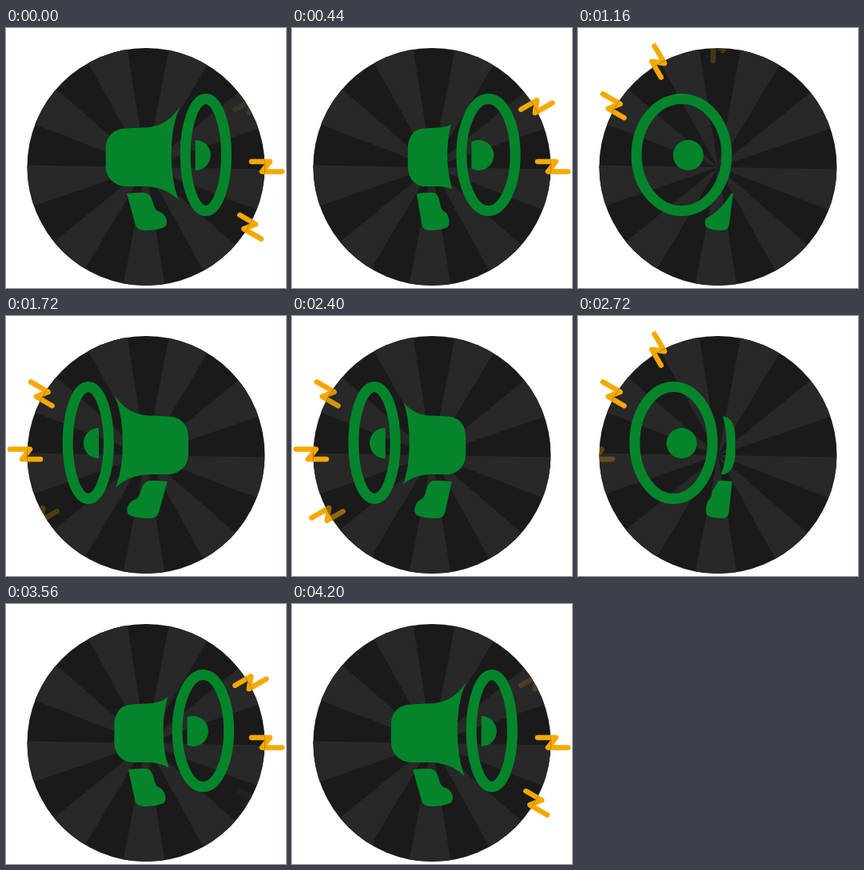
Recreate the animation shown at these times as an HTML page. Size 350 by 325 pixels, loop 4.24 s.

```html
<!DOCTYPE html>
<html lang="en">
<head>
<meta charset="utf-8">
<title>Turning megaphone</title>
<style>
  html, body { margin: 0; width: 100%; height: 100%; overflow: hidden; background: #fff; }
  svg { display: block; width: 350px; height: 325px; }
  .bolt { fill: none; stroke: #f5a800; stroke-width: 6.5; stroke-linecap: round; stroke-linejoin: round; }
</style>
</head>
<body>
<svg viewBox="0 0 350 325">
  <defs>
    <clipPath id="disc"><circle cx="175" cy="173.5" r="148.5"/></clipPath>
    <clipPath id="ballClip"><rect id="ballWindow" y="0" width="350" height="325"/></clipPath>
    <mask id="behindRing" maskUnits="userSpaceOnUse" x="0" y="0" width="350" height="325">
      <rect width="350" height="325" fill="#fff"/>
      <ellipse id="gap" cy="158.5" ry="70" stroke="#000" stroke-width="35"/>
    </mask>
  </defs>
  <g id="outerBolts"></g>
  <g clip-path="url(#disc)">
    <rect width="350" height="325" fill="#1a1a1a"/>
    <path id="rays" fill="#282828"/>
    <g id="innerBolts"></g>
  </g>
  <g fill="#04852b">
    <g mask="url(#behindRing)">
      <path id="body"/>
      <path id="handle"/>
    </g>
    <g clip-path="url(#ballClip)"><circle id="ball" cy="159" r="19"/></g>
    <ellipse id="ring" cy="158.5" ry="70" fill="none" stroke="#04852b" stroke-width="13"/>
  </g>
</svg>
<script>
const LOOP = 4240, STEP = 40, AXIS = 176.3, RAD = Math.PI / 180;
const el = id => document.getElementById(id);
const set = (node, attrs) => { for (const k in attrs) node.setAttribute(k, attrs[k]); };
const clamp = (v, lo, hi) => Math.min(hi, Math.max(lo, v));

// Alternating 20 degree sectors
let rays = '';
for (let a = 11; a < 360; a += 40) {
  const rim = deg => `${175 + 170 * Math.sin(deg * RAD)},${174 - 170 * Math.cos(deg * RAD)}`;
  rays += `M175,174L${rim(a)}L${rim(a + 20)}Z`;
}
set(el('rays'), { d: rays });

function addBolt(parent, index) {
  const bolt = document.createElementNS('http://www.w3.org/2000/svg', 'path');
  set(bolt, {
    class: 'bolt',
    d: 'M-18,-6H5L-5,6.5H20',
    transform: `translate(175 173) rotate(${30 - 30 * index}) translate(150 0)`
  });
  parent.append(bolt);
  return bolt;
}

const bolts = Array.from({ length: 9 }, (_, i) => ({
  bearing: 120 - 30 * i,
  outer: addBolt(el('outerBolts'), i),
  inner: addBolt(el('innerBolts'), i)
}));

// Time and bearing of the lit arc, in degrees clockwise from the top
const ARC = [[0, 102], [560, 66], [760, 43], [1160, -40], [1680, -78], [2000, -100],
  [2400, -87], [2800, -43], [3000, -4], [3360, 54], [3560, 77], [3980, 94], [LOOP, 102]];

function arcBearing(t) {
  const i = ARC.findIndex(([time]) => time > t);
  const [t0, a0] = ARC[i - 1], [t1, a1] = ARC[i];
  return a0 + (a1 - a0) * (t - t0) / (t1 - t0);
}

const swing = (t, centre, half) => Math.sin(clamp((t - centre) / half, -1, 1) * Math.PI / 2);

function drawBolts(t) {
  const arc = arcBearing(t);
  for (const { bearing, outer, inner } of bolts) {
    const alpha = clamp((44 - Math.abs(bearing - arc)) / 20, 0, 1);
    set(inner, { opacity: alpha });
    set(outer, { opacity: alpha >= 0.5 ? 1 : 0 });
  }
}

function drawRing(t) {
  const turn = t < LOOP / 2 ? -swing(t, 918, 680) : swing(t, 3048, 700);
  const angle = 68.5 * RAD * turn;
  const cx = AXIS + 79 * Math.sin(angle), rx = 70 * Math.cos(angle);
  set(el('ring'), { cx, rx });
  set(el('gap'), { cx, rx });
  set(el('ball'), { cx: AXIS + 65 * Math.sin(angle) });
  const inset = rx - 12.5;
  set(el('ballWindow'), { x: angle > 0 ? cx - inset : cx + inset - 350 });
  return cx;
}

function drawBody(lean, mouth) {
  const back = AXIS - 54 * lean, length = mouth - back;
  const p = (u, y) => `${back + u * length},${y} `;
  set(el('body'), {
    d: 'M' + p(0, 152) + 'C' + p(0, 135) + p(0.08, 126) + p(0.2, 125.5) +
      'L' + p(0.36, 124.5) + 'C' + p(0.52, 124.5) + p(0.66, 118) + p(0.78, 90) +
      'L' + p(0.76, 219) + 'C' + p(0.64, 203) + p(0.52, 198) + p(0.36, 198) +
      'L' + p(0.2, 198) + 'C' + p(0.08, 197) + p(0, 187) + p(0, 172) + 'Z'
  });
}

function drawHandle(lean) {
  const depth = 8 * Math.sqrt(1 - lean * lean) * (lean < 0 ? -1 : 1);
  const p = (offset, side, y) => `${AXIS + lean * offset + side * depth},${y} `;
  set(el('handle'), {
    d: 'M' + p(-24, -1, 207) + 'Q' + p(-12, 0, 205) + p(-4, 0.6, 206) +
      'C' + p(10, 0.8, 210) + p(2, 0.8, 227) + p(15, 1, 230) +
      'C' + p(23, 1, 234) + p(27, 1, 245) + p(20, 1, 249) +
      'Q' + p(12, 0.4, 253) + p(-2, -0.4, 253) +
      'Q' + p(-11, -1, 253) + p(-13, -1, 245) + 'Z'
  });
}

function draw(t) {
  drawBolts(t);
  const mouth = drawRing(t);
  const lean = Math.sin((t - 2980) / LOOP * 2 * Math.PI);
  drawBody(lean, mouth);
  drawHandle(lean);
}

const start = performance.now();
function tick() {
  const t = (performance.now() - start) % LOOP;
  draw(Math.floor(t / STEP) * STEP);
  requestAnimationFrame(tick);
}
tick();
</script>
</body>
</html>
```
